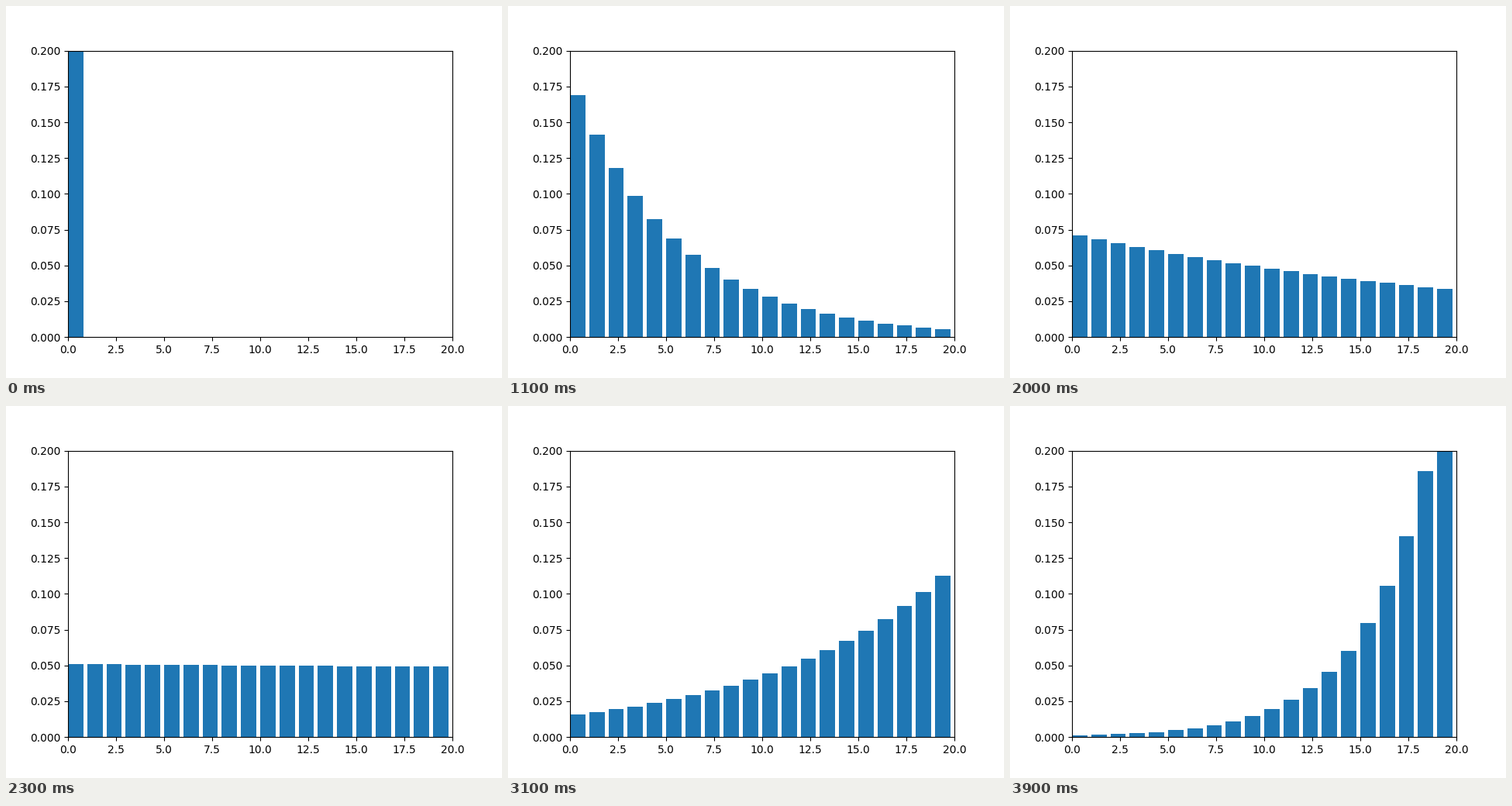
These frames come from a looping animation (640 by 480 pixels, 4 s). A matplotlib script:

```python
import matplotlib.pyplot as plt
import numpy as np
from matplotlib.animation import FuncAnimation

SIDES = 20
FRAMES = 40
INTERVAL = 100

faces = np.arange(SIDES)
means = np.linspace(0, 16, FRAMES)


def weights(slope):
    """Exponential distribution over the faces, normalised to one."""
    logits = slope * faces
    w = np.exp(logits - logits.max())
    return w / w.sum()


def max_entropy(mean):
    """Find the exponential distribution with the given mean by bisection."""
    low, high = -60.0, 60.0
    for _ in range(60):
        mid = (low + high) / 2
        if weights(mid) @ faces < mean:
            low = mid
        else:
            high = mid
    return weights((low + high) / 2)


fig, ax = plt.subplots(figsize=(6.4, 4.8), dpi=100)
bars = ax.bar(faces, max_entropy(means[0]), align="edge", color="#1f77b4")
ax.set_xlim(0, SIDES)
ax.set_ylim(0, 0.2)


def update(i):
    for bar, p in zip(bars, max_entropy(means[i])):
        bar.set_height(p)
    return bars.patches


anim = FuncAnimation(fig, update, frames=FRAMES, interval=INTERVAL,
                     repeat=True, repeat_delay=0)
plt.show()
```
